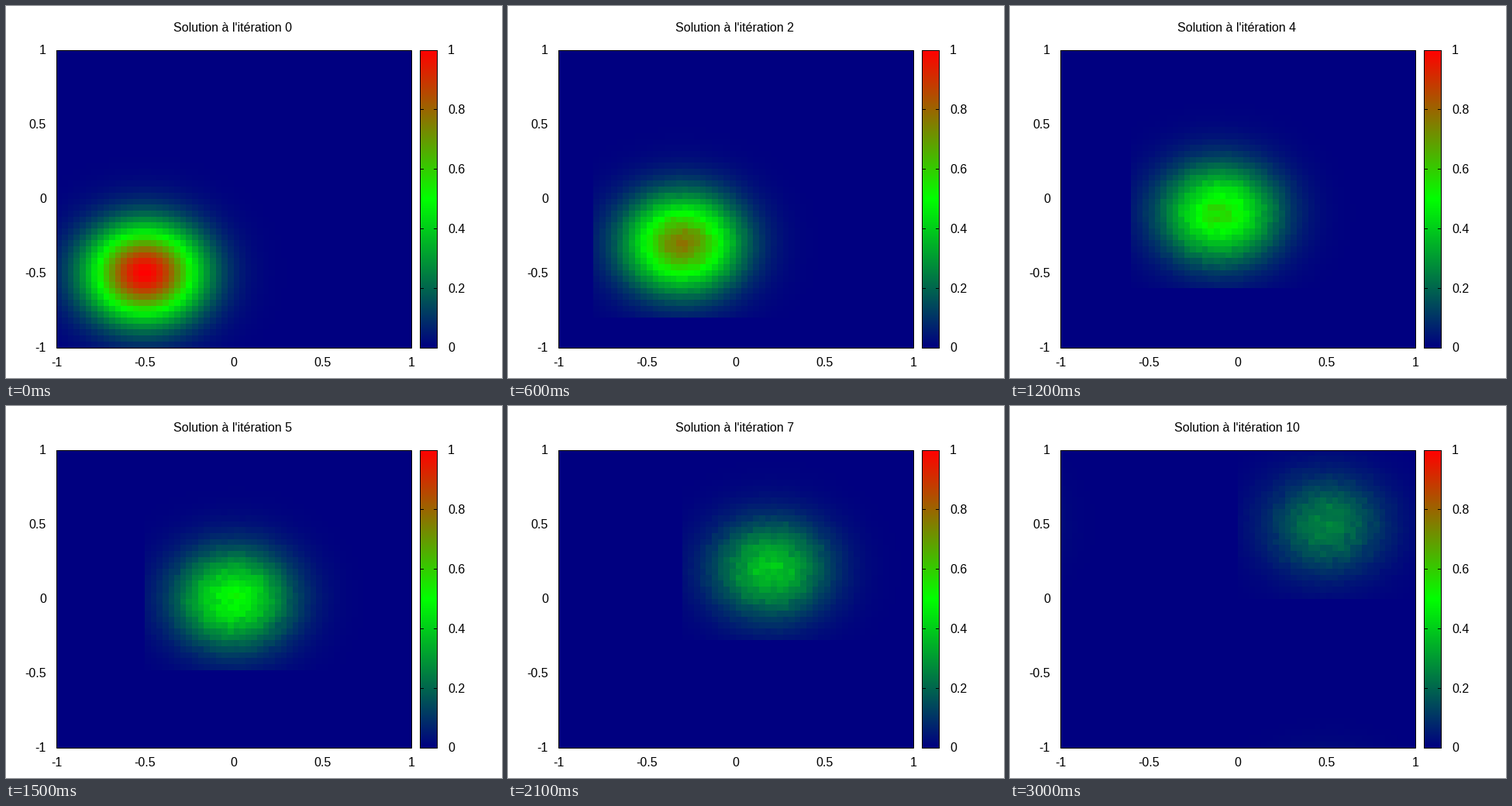
These frames come from a looping animation (640x480 px, 3.3 s). A matplotlib script:

```python
import numpy as np
import matplotlib.pyplot as plt
from matplotlib.animation import FuncAnimation
from matplotlib.colors import LinearSegmentedColormap

plt.rcParams["font.family"] = "Liberation Sans"
plt.rcParams["font.size"] = 11.52  # 16 px at 100 dpi

W, H, DPI = 640, 480, 100
LEFT, RIGHT, TOP, BOTTOM = 65, 523, 57, 441
BAR_L, BAR_R = 534, 556
NX, NY = 60, 50
STEPS, INTERVAL = 11, 300
SPEED = 0.1       # drift per iteration along both axes
SURVIVAL = 0.87   # mean survival per iteration
SAMPLES = 800     # random walkers per cell
PX = 72 / DPI

cmap = LinearSegmentedColormap.from_list(
    "heat", ["#000080", "#00ff00", "#ff0000"], N=1024)


def centres(n):
    return -1 + (np.arange(n) + 0.5) * 2 / n


def upstream(c, shift):
    """Foot of the characteristic, wrapped periodically into [-1, 1]."""
    return (c - shift + 1 - 1e-9) % 2 - 1


def solution(k):
    x = upstream(centres(NX), SPEED * k)
    y = upstream(centres(NY), SPEED * k)[:, None]
    u = np.exp(-10 * ((x + 0.5) ** 2 + (y + 0.5) ** 2))
    rng = np.random.default_rng(40 + k)
    return u * rng.binomial(SAMPLES, SURVIVAL ** k, u.shape) / SAMPLES


fig = plt.figure(figsize=(W / DPI, H / DPI), dpi=DPI, facecolor="white")
ax = fig.add_axes([0, 0, 1, 1])
ax.axis("off")


def edges(a, b, n):
    """Cell borders on whole pixels."""
    return np.floor(np.linspace(a, b, n + 1))


def heat(data, x0, x1):
    ny, nx = data.shape
    return ax.pcolormesh(edges(x0, x1, nx), edges(BOTTOM, TOP, ny), data,
                         cmap=cmap, vmin=0, vmax=1, antialiased=False)


def line(xs, ys):
    """One-pixel black line through the centres of the given pixels."""
    ax.plot(np.add(xs, 0.5), np.add(ys, 0.5), color="black", lw=PX,
            snap=False, solid_capstyle="projecting",
            solid_joinstyle="miter")


def box(x0, x1):
    line([x0, x1, x1, x0, x0], [TOP, TOP, BOTTOM, BOTTOM, TOP])


def label(x, y, s, ha):
    return ax.text(x, y, s, ha=ha, va="baseline", color="black")


field = heat(solution(0), LEFT, RIGHT)
heat(np.linspace(0, 1, BOTTOM - TOP)[:, None], BAR_L, BAR_R)
box(LEFT, RIGHT)
box(BAR_L, BAR_R)

for v in np.arange(6) / 5:
    y = BOTTOM + (TOP - BOTTOM) * v
    row = np.floor(y)
    line([BAR_L, BAR_L + 4], [row, row])
    line([BAR_R - 4, BAR_R], [row, row])
    label(570, y + 5.5, f"{v:g}", "left")

for v in (-1, -0.5, 0, 0.5, 1):
    f = (v + 1) / 2
    label(LEFT + (RIGHT - LEFT) * f, 465, f"{v:g}", "center")
    label(52, BOTTOM + (TOP - BOTTOM) * f + 5.5, f"{v:g}", "right")

title = label(292.5, 33, "", "center")
ax.set_xlim(0, W)
ax.set_ylim(H, 0)


def update(k):
    field.set_array(solution(k))
    title.set_text(f"Solution à l'itération {k}")
    return field, title


anim = FuncAnimation(fig, update, frames=STEPS, interval=INTERVAL,
                     repeat=True, repeat_delay=0, blit=False)
plt.show()
```
